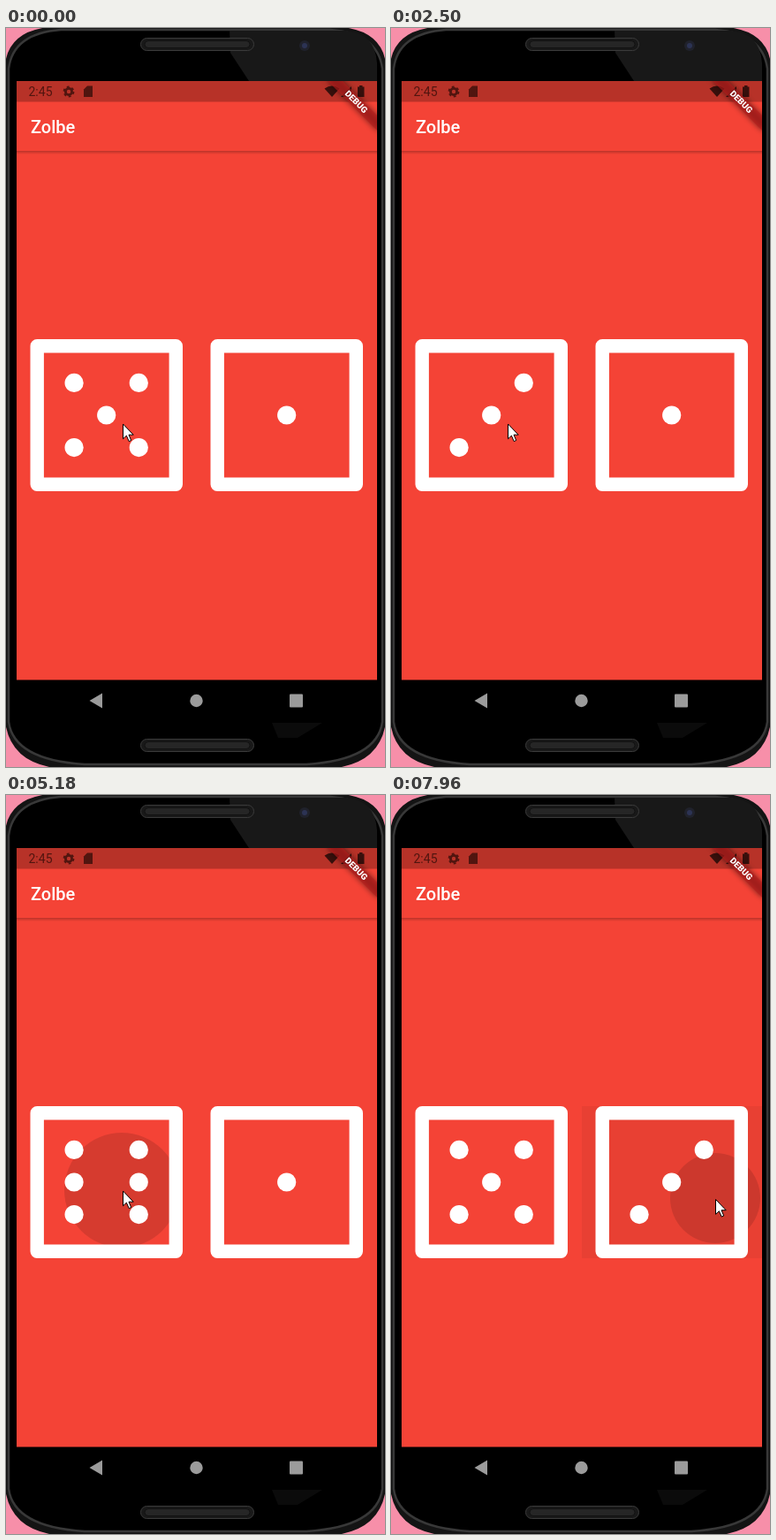
These frames come from a looping animation (429x836 px, 8 s). An HTML page:

```html
<!DOCTYPE html>
<html lang="en">
<head>
<meta charset="utf-8">
<title>Dice</title>
<style>
  html, body { margin: 0; width: 100%; height: 100%; overflow: hidden; background: #f78fa9; }
  svg { display: block; }
  text { font-family: Roboto, sans-serif; }
</style>
</head>
<body>
<svg width="429" height="836" viewBox="0 0 429 836">
  <defs>
    <clipPath id="screen"><rect x="12" y="60" width="408" height="677.5"/></clipPath>
    <clipPath id="cell"><rect id="cellRect" y="352" width="204" height="172"/></clipPath>
    <linearGradient id="shade" x2="0" y2="1">
      <stop stop-color="#000" stop-opacity=".24"/>
      <stop offset="1" stop-color="#000" stop-opacity="0"/>
    </linearGradient>
    <filter id="blur" x="-20%" y="-100%" width="140%" height="300%"><feGaussianBlur stdDeviation="3.4"/></filter>
    <g id="speaker">
      <rect x="152.5" y=".5" width="128" height="14" rx="7" fill="#191919" stroke="#3b3b3b"/>
      <rect x="157" y="3.5" width="119" height="8" rx="4" fill="#262626" stroke="#111"/>
    </g>
  </defs>

  <!-- Phone body -->
  <path d="M-1 40Q4 4 48 -1H381Q425 4 430 40V785Q424 830 374 837H55Q5 830 -1 785Z" fill="#141414"/>
  <path d="M3 46Q8 6 62 2H367Q421 6 426 46V785Q420 828 340 833H89Q9 828 3 785Z"
    fill="#000" stroke="#383838" stroke-width="2.5"/>
  <path d="M253 3H385Q418 6 420 40V60H275L254 28Z" fill="#181818"/>
  <path d="M301 786H358L330 803H308Z" fill="#0b0b0b"/>
  <use href="#speaker" y="11"/>
  <use href="#speaker" y="804"/>
  <circle cx="338" cy="20" r="6" fill="#20222c"/>
  <circle cx="338" cy="20" r="3" fill="#2c3354"/>

  <!-- App -->
  <g clip-path="url(#screen)">
    <rect x="12" y="60" width="408" height="678" fill="#f44336"/>
    <rect x="12" y="139" width="408" height="4" fill="url(#shade)"/>
    <rect x="12" y="60" width="408" height="23.5" fill="#b73228"/>
    <g fill="#51150f">
      <text x="25.5" y="77" font-size="14">2:45</text>
      <circle cx="71" cy="72" r="3.6" fill="none" stroke="#51150f" stroke-width="2.8"/>
      <circle cx="71" cy="72" r="5.4" fill="none" stroke="#51150f" stroke-width="2" stroke-dasharray="2.8 2.855"/>
      <path d="M92 65.5H98V78H88V69.5Z"/>
    </g>
    <g fill="#38100c">
      <path d="M360.5 68.5Q369 62.5 377.5 68.5L369 78Z"/>
      <path d="M391 66V78H379Z"/>
      <path d="M400 65H403.5V66.5H405.5V78H398V66.5H400Z"/>
    </g>
    <text x="28" y="118.5" font-size="20" font-weight="500" fill="#fff">Zolbe</text>
    <g transform="translate(420 60) rotate(45)">
      <rect x="-40" y="27.5" width="80" height="12" opacity=".5" filter="url(#blur)"/>
      <rect x="-40" y="27.5" width="80" height="12" fill="#b71c1c" fill-opacity=".63"/>
      <text y="36.5" font-size="9.8" font-weight="900" text-anchor="middle" fill="#fff">DEBUG</text>
    </g>
    <g clip-path="url(#cell)">
      <rect id="highlight" y="352" width="204" height="172"/>
      <circle id="ripple" fill-opacity=".12"/>
    </g>
    <g id="dice" fill="#fff"></g>
  </g>

  <!-- Navigation bar -->
  <g fill="#9b9b9b">
    <path d="M109 752.5V769.5L94.5 761Z"/>
    <circle cx="215.5" cy="761" r="7.2"/>
    <rect x="321" y="753.5" width="15" height="15" rx="1"/>
  </g>
  <path id="cursor" d="M0 0V16.8L3.9 13.2 6.7 19.6 9.2 18.5 6.5 12.2H11.7Z" fill="#fff" stroke="#000"/>
</svg>
<script>
const LOOP = 8000, STEP = 150;
const MOVE_START = 6150, MOVE_TIME = 570, MOVE_STEPS = 4;
const $ = id => document.getElementById(id);

// Presses in order: when, how long, how far the ripple spreads and the face rolled, if it changes.
const tap = (start, hold, spread, face) =>
  ({ start, hold, spread, face, steps: Math.round(hold / STEP), right: start > MOVE_START });
const taps = [
  tap(120, 150, 29, 3),
  tap(670, 150, 45),
  tap(1100, 240, 63),
  tap(1740, 760, 100),
  tap(2810, 270, 97, 6),
  tap(3510, 150, 20, 5),
  tap(4090, 150, 43, 1),
  tap(4510, 240, 80, 4),
  tap(5180, 120, 65, 6),
  tap(5730, 120, 45, 5),
  tap(6870, 150, 31, 3),
  tap(7450, 120, 64),
  tap(7840, 240, 51)
];

const set = (el, attrs) => { for (const k in attrs) el.setAttribute(k, attrs[k]); };
function add(tag, attrs) {
  const el = document.createElementNS('http://www.w3.org/2000/svg', tag);
  set(el, attrs);
  return $('dice').appendChild(el);
}

// Centre on odd faces, one diagonal from 2, the other from 4, the sides on 6.
function hasPip(face, col, row) {
  if (!col) return !row && face % 2 === 1;
  return face >= (row === 0 ? 6 : row === col ? 4 : 2);
}

function makeDie(x) {
  add('rect', { x: x + 23.2, y: 359.7, width: 157.1, height: 156.6, fill: 'none',
    stroke: '#fff', 'stroke-width': 15.4, 'stroke-linejoin': 'round' });
  const dots = [];
  for (let col = -1; col <= 1; col++)
    for (let row = -1; row <= 1; row++)
      dots.push({ col, row, el: add('circle', { cx: x + 101.7 + col * 36.6, cy: 438 + row * 36.6, r: 10.6 }) });
  return face => dots.forEach(({ col, row, el }) =>
    set(el, { visibility: hasPip(face, col, row) ? 'visible' : 'hidden' }));
}
const showLeft = makeDie(12), showRight = makeDie(216);

function draw(now) {
  const t = now % LOOP;
  let left = 5, right = 1, radius = 0, alpha = 0, cellX = 12;

  for (const { start, hold, spread, face, steps, right: onRight } of taps) {
    if (t < start) break;
    const step = Math.floor((t - start) / hold * steps) + 1;
    if (face && step >= steps) onRight ? right = face : left = face;
    if (step <= steps) {
      radius = spread * (step / steps) ** .6;
      alpha = step > 1 ? .05 : 0;
      cellX = onRight ? 216 : 12;
    }
  }
  showLeft(left);
  showRight(right);

  const onRight = cellX > 12;
  set($('cellRect'), { x: cellX });
  set($('highlight'), { x: cellX, 'fill-opacity': alpha });
  set($('ripple'), { cx: onRight ? 367 : 131, cy: onRight ? 456 : 447, r: radius });

  // The pointer crosses over in visible jumps along an eased path.
  const jumps = t < MOVE_START ? 0 : Math.floor((t - MOVE_START) / MOVE_TIME * MOVE_STEPS) + 1;
  const p = Math.min(1, jumps / (MOVE_STEPS + 1));
  const eased = p * p * (3 - 2 * p);
  set($('cursor'), { transform: `translate(${132.5 + 235 * eased} ${448 + 9.5 * eased})` });
  requestAnimationFrame(draw);
}
draw(performance.now());
</script>
</body>
</html>
```
